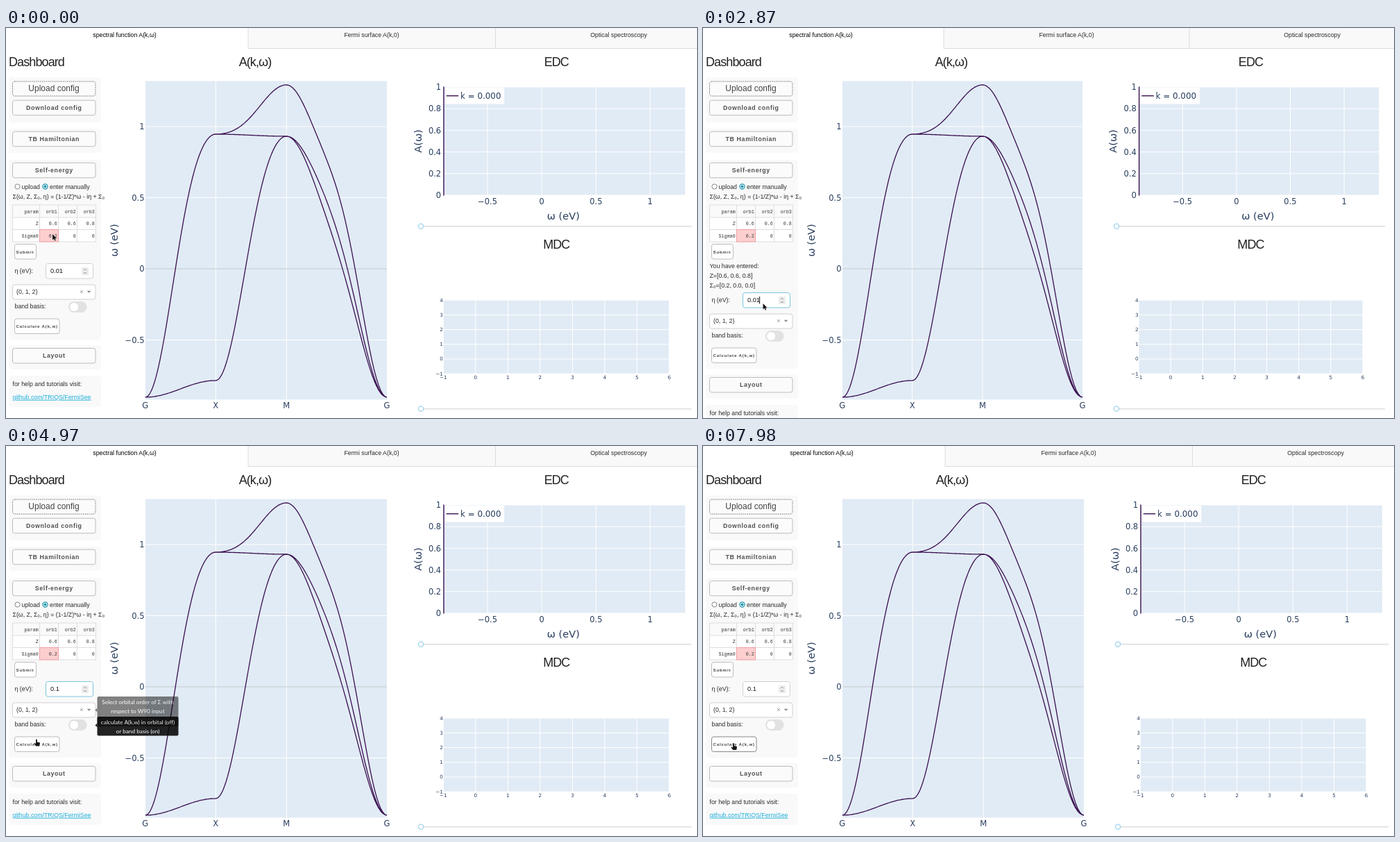
An HTML page that plays this animation: 996 px wide and 562 px high, repeating every 8000 ms.

```html
<!DOCTYPE html>
<html lang="en">
<head>
<meta charset="utf-8">
<title>Spectral function dashboard</title>
<style>
  html, body { margin: 0; width: 100%; height: 100%; overflow: hidden; background: #fff; }
  svg { display: block; width: 100vw; height: 100vh; }
  text { font-family: "Liberation Sans", Arial, sans-serif; font-size: 8.8px; fill: #2a2a2a; white-space: pre; }
  .title { font-size: 18px; letter-spacing: -0.9px; fill: #222; }
  .btn { font-size: 8.8px; font-weight: bold; letter-spacing: 0.65px; fill: #505050; }
  .small { font-size: 6.2px; font-weight: bold; letter-spacing: 0.8px; fill: #444; }
  .mono { font-family: "Liberation Mono", "DejaVu Sans Mono", monospace; font-size: 6.7px; fill: #333; }
  .tick { font-family: "DejaVu Sans", sans-serif; font-size: 11.5px; fill: #2a3f5f; }
  .axis { font-family: "DejaVu Sans", sans-serif; font-size: 14.6px; fill: #2a3f5f; }
  .mini { font-family: "DejaVu Sans", sans-serif; font-size: 7.2px; fill: #2a3f5f; }
  .tip { font-family: Lato, sans-serif; font-size: 8.25px; fill: #fff; }
  .mid { text-anchor: middle; }
  .end { text-anchor: end; }
</style>
</head>
<body>
<svg id="stage" viewBox="0 0 996 562" preserveAspectRatio="none">
  <g id="frame"></g>
  <g id="plots"></g>
  <g id="panel"></g>
  <g id="lower"></g>
  <g id="tips"></g>
  <g id="cursor"></g>
</svg>
<script>
const LOOP = 8000;
const $ = id => document.getElementById(id);
const BG = '#e1ebf5', CURVE = '#3a0f50';

const text = (x, y, s, cls = '', extra = '') =>
  `<text x="${x}" y="${y}" class="${cls}" ${extra}>${s}</text>`;
const rect = (x, y, w, h, fill, stroke = 'none', r = 0, extra = '') =>
  `<rect x="${x}" y="${y}" width="${w}" height="${h}" fill="${fill}" stroke="${stroke}" rx="${r}" ${extra}/>`;
const line = (x1, y1, x2, y2, stroke, w = 1) =>
  `<path d="M${x1} ${y1}L${x2} ${y2}" stroke="${stroke}" stroke-width="${w}" fill="none"/>`;
const circle = (x, y, r, fill, stroke = 'none', w = 1) =>
  `<circle cx="${x}" cy="${y}" r="${r}" fill="${fill}" stroke="${stroke}" stroke-width="${w}"/>`;
const card = (y0, y1) => rect(4, y0, 133, y1 - y0, '#f9f9f9', 'none', 4);
const button = (y, label) =>
  rect(9.5, y, 119.5, 21.5, '#fbfbfb', '#bcbcbc', 3) + text(69.3, y + 13.8, label, 'btn mid');
const smallButton = (y, w, label, active) =>
  rect(12.5, y, w, 21.5, '#fff', active ? '#888' : '#bcbcbc', 3) + text(14.5, y + 13, label, 'small');

// Piecewise linear value from [time, value...] keys
function track(keys, t, i = 1) {
  if (t <= keys[0][0]) return keys[0][i];
  for (let k = 1; k < keys.length; k++) {
    const a = keys[k - 1], b = keys[k];
    if (t < b[0]) return a[i] + (b[i] - a[i]) * (t - a[0]) / (b[0] - a[0]);
  }
  return keys[keys.length - 1][i];
}

// Cosine band segment: k lifts the middle, skew steepens the start
function band(x0, x1, y0, y1, k, skew = 0) {
  let d = '';
  for (let n = 0; n <= 48; n++) {
    const s = n / 48, c = Math.cos(Math.PI * s);
    const y = y0 + (y1 - y0) * (1 - c) / 2 - (k - skew * c) * (1 - c * c);
    d += (n ? 'L' : 'M') + (x0 + (x1 - x0) * s).toFixed(2) + ' ' + y.toFixed(2);
  }
  return d;
}

function drawFrame(side) {
  const t1 = side ? 347 : 349, t2 = side ? 701 : 705.5;
  let s = rect(t1, -1, 997 - t1, 30.5, '#f9f9f9') + line(t1, 29.5, 996, 29.5, '#dcdcdc')
    + line(t1, 0, t1, 29.5, '#dcdcdc') + line(t2, 0, t2, 29.5, '#dcdcdc');
  s += text(side ? 170 : 171, 13, 'spectral function A(k,ω)', 'mid', 'style="fill:#000"')
    + text(side ? 524 : 527, 13, 'Fermi surface A(k,0)', 'mid')
    + text(side ? 878 : 883, 13, 'Optical spectroscopy', 'mid');
  const mid = side ? 789.5 : 793.3, x = side ? 596 : 598, end = side ? 983 : 988;
  s += text(4, 55, 'Dashboard', 'title') + text(side ? 357.8 : 359, 55, 'A(k,ω)', 'title mid')
    + text(mid, 55, 'EDC', 'title mid') + text(mid, 317.5, 'MDC', 'title mid');
  for (const y of [285.8, 548.8])
    s += line(x, y, end, y, '#e4e4e4', 2) + circle(x, y, 3.6, '#fff', '#a0d3ee', 1.3);
  return s;
}

function bandPlot(narrow) {
  const w = narrow ? 346 : 348, G = 201, X = G + w * .291, M = G + w * .584, E = G + w;
  let s = rect(G, 76.5, w, 459, BG);
  for (const x of [X, M]) s += line(x, 76.5, x, 535.5, '#fff');
  for (const v of [1, .5, 0, -.5]) {
    const y = 347 - v * 205;
    s += line(G, y, E, y, v ? '#fff' : '#c6c9ce');
    s += text(199.5, y + 4, String(v).replace('-', '−'), 'tick end');
  }
  const d = band(G, X, 532, 153, 41) + band(G, X, 532, 508, 0) + band(X, M, 508, 156, 31)
    + band(X, M, 153, 156, 0) + band(X, M, 153, 82, -10)
    + band(M, E, 82, 532, 76, 75) + band(M, E, 156, 532, 25, 40) + band(M, E, 156, 532, 53, 40);
  s += `<path d="${d}" fill="none" stroke="${CURVE}" stroke-width="1.3" stroke-linejoin="round"/>`;
  [[G - .4, 'G'], [X, 'X'], [M, 'M'], [E, 'G']].forEach(([x, l]) => s += text(x, 548, l, 'tick mid'));
  return s + text(0, 0, 'ω (eV)', 'axis mid', 'transform="translate(161 306) rotate(-90)"');
}

function edcPlot(side, narrow) {
  const x0 = side ? 628.3 : 630.7, w = narrow ? 346 : 348.3, px = w / 2.228;
  let s = rect(x0, 85, w, 156, BG);
  for (let i = 0; i <= 5; i++) {
    const y = 241 - i * 31.2;
    s += line(x0, y, x0 + w, y, '#fff') + text(x0 - 3.5, y + 4.2, +(i * .2).toFixed(1), 'tick end');
  }
  for (const v of [-.5, 0, .5, 1]) {
    const x = x0 + (v + .905) * px;
    s += line(x, 85, x, 241, '#fff') + text(x, 254, String(v).replace('-', '−'), 'tick mid');
  }
  s += line(x0 + .3, 84.5, x0 + .3, 241.5, CURVE, 1.4);
  s += rect(x0 + 1.5, 86, 86, 23.5, '#fff') + line(x0 + 4, 97.7, x0 + 21.5, 97.7, CURVE, 1.4);
  s += text(x0 + 24.3, 102, 'k = 0.000', 'tick', 'style="font-size:11.9px"');
  s += text(x0 + w / 2 - 1.5, 276, 'ω (eV)', 'axis mid');
  return s + text(0, 0, 'A(ω)', 'axis mid', `transform="translate(${x0 - 32} 163) rotate(-90)"`);
}

function mdcPlot(side, narrow) {
  const x0 = side ? 628 : 630.3, w = narrow ? 323 : 325.7;
  let s = rect(x0, 392, w, 106, BG);
  for (let v = -1; v <= 4; v++) {
    const y = 477 - v * 21.2;
    s += line(x0, y, x0 + w, y, '#fff') + text(x0 - .5, y + 2.4, String(v).replace('-', '−'), 'mini end');
  }
  for (let v = -1; v <= 6; v++) {
    const x = x0 + (v + 1) * w / 7;
    s += line(x, 392, x, 498, '#fff') + text(x, 505.6, String(v).replace('-', '−'), 'mini mid');
  }
  return s;
}

function drawPanel(side, submitActive) {
  let s = card(71, 136) + card(145, 180) + card(190, side ? 491 : 449);
  s += rect(9.5, 77, 119.5, 21, '#fbfbfb', '#666', 3, 'stroke-dasharray="1.6 1.2" stroke-width=".9"')
    + text(69, 91, 'Upload config', 'mid', 'style="font-size:12px;fill:#444"');
  s += button(104.2, 'Download config') + button(149.2, 'TB Hamiltonian') + button(194.3, 'Self-energy');
  s += circle(16.5, 228.5, 3.6, '#fff', '#777', .9) + text(22.5, 231.5, 'upload');
  s += circle(56.5, 228.5, 3.6, '#fff', '#1b94ad', 1.2) + circle(56.5, 228.5, 2, '#1b94ad')
    + text(63, 231.5, 'enter manually');
  s += text(9.5, 245.5, 'Σ(ω, Z, Σ₀, η) = (1-1/Z)*ω - iη + Σ₀');

  const cols = [9.5, 48.5, 75.5, 102.5, 129.5], rows = [255, 273, 290.5, 308];
  s += rect(9.5, 255, 120, 53, '#fff') + rect(9.5, 255, 120, 18, '#fafafa');
  cols.forEach(x => s += line(x, 255, x, 308, '#dadada', .9));
  rows.forEach(y => s += line(9.5, y, 129.5, y, '#dadada', .9));
  s += rect(48.5, 290.5, 27, 17.5, '#fccfcf', '#f2a0a4');
  [['param', 'orb1', 'orb2', 'orb3'], ['Z', '0.6', '0.6', '0.8'], ['Sigma0', '0.2', '0', '0']]
    .forEach((row, r) => row.forEach((v, c) =>
      s += text(cols[c + 1] - 1.8, 266.6 + r * 17.6, v, 'mono end')));
  s += smallButton(311.5, 31, 'Submit', submitActive);
  if (side) s += text(9.5, 346, 'You have entered:') + text(9.5, 359.7, 'Z=[0.6, 0.6, 0.8]')
    + text(9.5, 373.5, 'Σ₀=[0.2, 0.0, 0.0]');
  return s;
}

function drawLower(value, focused, caret, calcActive) {
  let s = card(457, 492) + card(501, 546);
  s += text(12.5, 353, 'η (eV):')
    + rect(57.5, 339.5, 68, 21.5, '#fff', focused ? '#7cc3dd' : '#d0d0d0', 3)
    + text(64, 353, value, '', 'style="fill:#111;font-size:9.2px"');
  if (caret) s += line(64.8 + value.length * 4.2, 345, 64.8 + value.length * 4.2, 355.5, '#111');
  s += rect(109, 345, 10, 11, '#ececec', 'none', 1)
    + '<path d="M112 349.2l2-2 2 2M112 352l2 2 2-2" fill="none" stroke="#888" stroke-width=".9"/>';
  s += rect(9.5, 370, 119.5, 21, '#fff', '#d0d0d0', 3) + text(15, 383, '(0, 1, 2)')
    + '<path d="M107 378l3.8 4M110.8 378l-3.8 4" stroke="#999" stroke-width=".9"/>'
    + '<path d="M116.8 378.8h5.6l-2.8 3z" fill="#888"/>';
  s += text(12.5, 403.5, 'band basis:') + rect(90, 394, 26.5, 16, '#e2e2e2', 'none', 8)
    + circle(98.2, 402, 6.6, '#fff', '#d4d4d4', .7);
  s += smallButton(419, 64.5, 'Calculate A(k,w)', calcActive) + button(461.5, 'Layout');
  s += text(9.5, 516, 'for help and tutorials visit:')
    + text(9.5, 534.8, 'github.com/TRIQS/FermiSee', '', 'style="fill:#1eaedb;text-decoration:underline"');
  return s;
}

const tip = (y, h, arrowY, lines, alpha) => alpha <= 0 ? '' :
  `<g opacity="${alpha}">` + rect(131.5, y, 117, h, '#050505', 'none', 2)
  + `<path d="M131.5 ${arrowY - 3}v6l-3-3z" fill="#050505"/>`
  + lines.map((l, i) => text(190, y + 11 + i * 12.5, l, 'tip mid')).join('') + '</g>';

const orderKeys = [[4130, 0], [4340, .72], [4410, .9], [4830, .9], [4970, .5], [5180, 0]];
const basisKeys = [[3570, 0], [3640, .1], [3850, .9], [4270, .9], [4340, .68], [4480, 0],
  [4620, 0], [4830, .9], [4970, .88], [5110, .8], [5320, 0]];

// The tooltip shown last lies on top
function drawTips(t) {
  const order = tip(361, 43, 380.5, ['Select orbital order of Σ with', 'respect to W90 input', 'Hamiltonian'],
    track(orderKeys, t));
  const basis = tip(390, 27.5, 402.5, ['calculate A(k,w) in orbital (off)', 'or band basis (on)'],
    track(basisKeys, t));
  return t < 4550 ? basis + order : order + basis;
}

const path = [[0, 67, 297], [280, 67, 297], [1050, 33, 315.5], [1890, 33, 315.5], [2590, 86.5, 397],
  [3990, 86.5, 397], [4340, 86.5, 374], [4550, 86.5, 374], [4970, 44, 423], [5180, 44, 428.5]];
const ARROW = 'M0 0V8.6L2 6.8L3.4 9.8L4.8 9.1L3.5 6.2H6.2Z';
const HAND = 'M-1 0Q0-1 .8 0V3.4L4.2 4.2Q5 4.6 5 5.6L4.2 9.6H-.8L-3.6 5.8Q-3.4 4.6-2 5.4L-1 6Z';

function drawCursor(t) {
  const hand = (t >= 980 && t <= 1960) || t >= 4900;
  return `<path transform="translate(${track(path, t, 1)} ${track(path, t, 2)})" d="${hand ? HAND : ARROW}"
    fill="#161616" stroke="#fff" stroke-width=".8" paint-order="stroke"/>`;
}

const drawn = {};
function put(id, html) {
  if (drawn[id] !== html) $(id).innerHTML = drawn[id] = html;
}

function capture(t) {
  const phase = (t + 70) % 350;
  return Math.max(0, t - phase + Math.min(210, Math.floor(phase / 70) * 70));
}

function render(time) {
  const t = capture(time % LOOP);
  const side = t >= 1400 && t < 3500;
  const narrow = t >= 1540 && t < 4130, narrowMdc = t >= 1680 && t < 4130;
  const value = t < 3080 ? '0.01' : t < 3220 ? '0.0' : t < 3360 ? '0.' : '0.1';
  const focused = t >= 2590 && t < 5530;
  const caret = focused && (t - 2430) % 1000 < 500;
  put('frame', drawFrame(side));
  put('plots', bandPlot(narrow) + edcPlot(side, narrow) + mdcPlot(side, narrowMdc));
  put('panel', drawPanel(side, t >= 1050 && t < 2590));
  put('lower', drawLower(value, focused, caret, t >= 5180));
  $('lower').setAttribute('transform', `translate(0 ${side ? 42 : 0})`);
  put('tips', drawTips(t));
  put('cursor', drawCursor(t));
}

const start = performance.now();
function loop() {
  render(performance.now() - start);
  requestAnimationFrame(loop);
}
loop();
</script>
</body>
</html>
```
